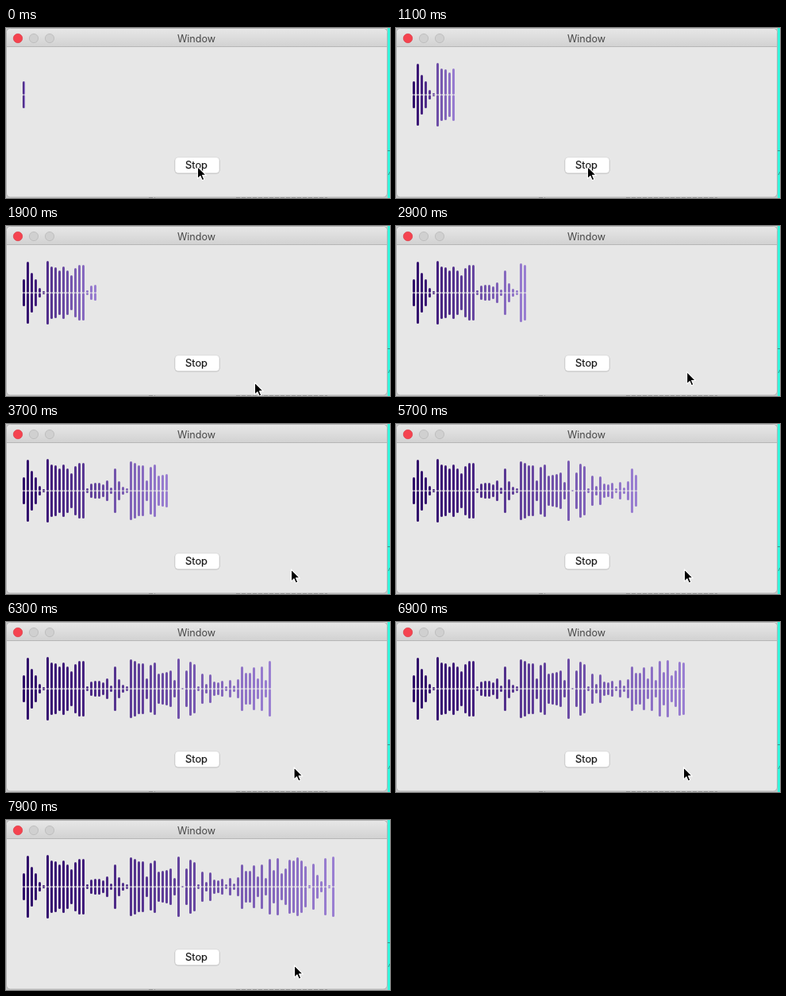
An HTML page that plays this animation: 484 px wide and 214 px high, repeating every 8 s.

```html
<!DOCTYPE html>
<html lang="en">
<head>
<meta charset="utf-8">
<title>Sound levels</title>
<style>
html, body { margin: 0; width: 100%; height: 100%; overflow: hidden; background: #c4c4c4; }
svg { display: block; width: 484px; height: 214px; }
text { font-family: Inter, Roboto, sans-serif; text-anchor: middle; }
</style>
</head>
<body>
<svg viewBox="0 0 484 214">
  <defs>
    <linearGradient id="title" x2="0" y2="1">
      <stop stop-color="#e7e7e7"/><stop offset="1" stop-color="#d2d2d2"/>
    </linearGradient>
    <linearGradient id="tint" gradientUnits="userSpaceOnUse" x1="21" y1="0" x2="24" y2="0">
      <stop stop-color="#2d0768"/><stop offset="1" stop-color="#9a7fd2"/>
    </linearGradient>
  </defs>

  <!-- what shows behind the window -->
  <rect x="481" width="3" height="214" fill="#35f5dc"/>
  <path d="M150 .5H480" stroke="#d8d8d8"/>
  <path d="M482 185l2-4M481 154.5h3" stroke="#3c8f86"/>
  <path d="M180 213.5h8M290 213.5h115" stroke="#777" stroke-dasharray="5 2"/>

  <!-- window -->
  <rect x=".5" y=".5" width="480" height="212.5" rx="5" fill="#e7e7e7" stroke="#b3b3b3"/>
  <path d="M1 23V6a5 5 0 0 1 5-5H475a5 5 0 0 1 5 5V23Z" fill="url(#title)"/>
  <path d="M1 23.5H480" stroke="#b6b6b6"/>
  <circle cx="15" cy="13" r="5.7" fill="#f5434f" stroke="#dc3a45" stroke-width=".7"/>
  <g fill="#d0d0d0" stroke="#b9b9b9" stroke-width=".8">
    <circle cx="35" cy="13" r="5.6"/><circle cx="55" cy="13" r="5.6"/>
  </g>
  <text x="240" y="18" font-size="12.6" fill="#484848">Window</text>

  <g id="bars" fill="url(#tint)"></g>

  <rect x="212.5" y="163" width="57" height="20.5" rx="4.5" fill="#b9b9b9"/>
  <rect x="213" y="162.7" width="56" height="20" rx="4" fill="#fff" stroke="#cfcfcf" stroke-width=".6"/>
  <text x="240" y="177.3" font-size="12.8" fill="#161616" stroke="#161616" stroke-width=".2">Stop</text>

  <path id="cursor" d="M0 0V15.2L3.5 11.9 5.8 17.2 8.3 16.1 6 10.9H10.8Z"
        fill="#000" stroke="#fff" stroke-width="1.1" stroke-linejoin="round"/>
</svg>
<script>
const LOOP = 8000, STEP = 100, MID = 84, PITCH = 5, LEFT = 21;

// half height of each bar
const levels = [
  17, 39, 25, 17, 6, 2, 40, 33, 32, 28, 33, 28, 22, 31, 35, 35, 3, 9, 10, 10,
  8, 13, 4, 28, 12, 5, 3, 37, 35, 32, 32, 13, 30, 33, 19, 20, 21, 23, 11, 38,
  1, 23, 34, 31, 3, 19, 6, 18, 9, 8, 10, 3, 11, 4, 12, 28, 20, 20, 27, 13,
  28, 11, 35, 21, 36, 17, 23, 34, 33, 37, 33, 26, 2, 29, 15, 7, 36, 2, 38
];

// time, x, y of the pointer tip
const moves = [
  [0, 241.5, 174.5], [1700, 241.5, 174.5], [1800, 243, 177], [1900, 313.5, 197],
  [2100, 352, 198], [2400, 370, 193], [2800, 370, 184], [3100, 360, 183],
  [3700, 359.5, 183], [4500, 361, 183], [5000, 364.5, 184], [5700, 363.5, 183],
  [6900, 362.5, 183], [7900, 363.5, 183]
];

const $ = id => document.getElementById(id);
const group = $('bars'), tint = $('tint'), cursor = $('cursor');

function half(parent, x, y, h) {
  const r = document.createElementNS('http://www.w3.org/2000/svg', 'rect');
  const attrs = { x, y, width: 3, height: h, rx: 1.5, ry: Math.min(1.5, h / 2) };
  for (const k in attrs) r.setAttribute(k, attrs[k]);
  parent.append(r);
}

const bars = levels.map((h, i) => {
  const g = document.createElementNS('http://www.w3.org/2000/svg', 'g');
  const x = LEFT + i * PITCH;
  half(g, x, MID - h, h - .2);
  half(g, x, MID + .2, h - .2);
  group.append(g);
  return g;
});

function tipAt(t) {
  const n = moves.findIndex(m => m[0] > t);
  if (n < 0) return moves[moves.length - 1].slice(1);
  const [t0, x0, y0] = moves[n - 1], [t1, x1, y1] = moves[n];
  const p = (t - t0) / (t1 - t0);
  return [x0 + (x1 - x0) * p, y0 + (y1 - y0) * p];
}

function draw(now) {
  const tick = Math.floor((now % LOOP) / STEP);
  const last = Math.max(0, tick - 1);
  bars.forEach((b, i) => b.setAttribute('visibility', i <= last ? 'visible' : 'hidden'));
  tint.setAttribute('x2', LEFT + last * PITCH + 3);
  cursor.setAttribute('transform', `translate(${tipAt(tick * STEP)})`);
}

const start = performance.now();
function frame() {
  draw(performance.now() - start);
  requestAnimationFrame(frame);
}
frame();
</script>
</body>
</html>
```
